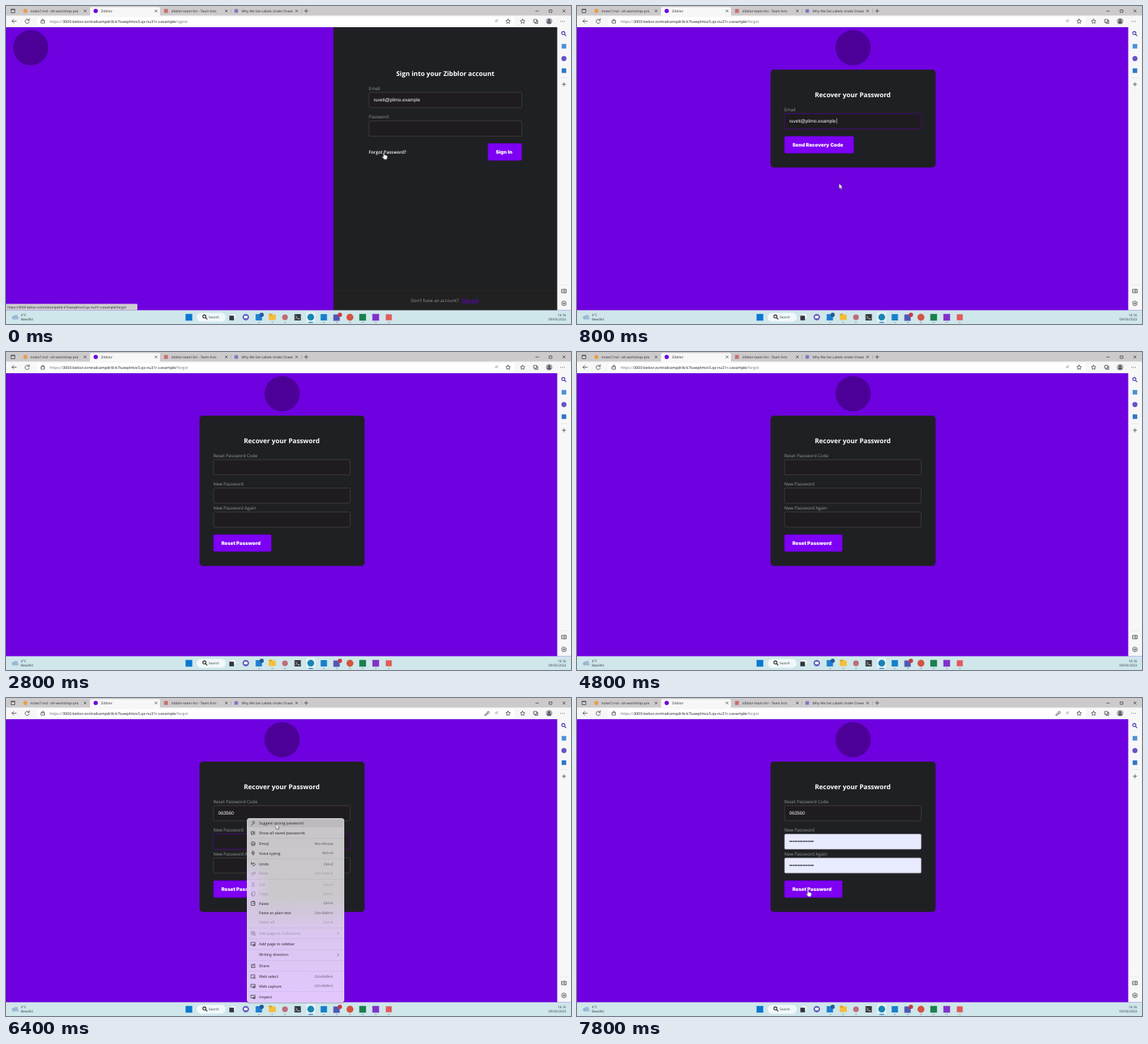
Animation of 800x450 px, one loop 8 s. Source, as an HTML page:

```html
<!DOCTYPE html>
<html lang="en">
<head>
<meta charset="utf-8">
<title>Password recovery</title>
<style>
html, body { margin: 0; width: 100%; height: 100%; overflow: hidden; background: #6f00e0; }
svg { display: block; width: 100vw; height: 100vh; }
text { font-family: "Open Sans", "Noto Sans", sans-serif; text-rendering: geometricPrecision; white-space: pre; }
.tab { font-size: 4.9px; fill: #2c2c2e; }
.url { font-size: 5.35px; fill: #66696c; }
.url tspan { fill: #151718; }
.status { font-size: 4.6px; font-weight: 500; fill: #1c1c1c; }
.tray { font-size: 4.7px; fill: #2b3a40; }
.end { text-anchor: end; }
.title { font-size: 9.3px; font-weight: 700; fill: #fff; text-anchor: middle; }
.label { font-size: 6.25px; fill: #989899; }
.link { font-size: 6.25px; font-weight: 600; fill: #fff; }
.button { font: 900 6.95px Inter, sans-serif; fill: #fff; }
.input { font: 6.67px "Liberation Sans", Arial, sans-serif; fill: #fff; }
.dark { fill: #14141c; }
.field { fill: #1f1c20; stroke: #48433f; stroke-width: .8; }
.focus { fill: #1f1c20; stroke: #48008f; stroke-width: .8; }
.filled { fill: #e8eafd; stroke: #8c8c9a; stroke-width: .5; }
.action { fill: #7d00f3; stroke: #6400c8; stroke-width: .8; }
.item { font-size: 5.4px; fill: #222025; }
.key { font-size: 4.8px; fill: #4d4952; text-anchor: end; }
.off { fill: #98909f; }
.icon { fill: none; stroke: #3c4043; stroke-width: .8; stroke-linecap: round; stroke-linejoin: round; }

.timed { animation: 8s step-end infinite; }
.signin { animation-name: signin; }
.recover { animation-name: recover; }
.focused { animation-name: focused; }
.typed { animation-name: typed; }
.reset { animation-name: reset; }
.code { animation-name: code; }
.menu { animation-name: menu; }
.saved { animation-name: saved; }
.keyhole { animation-name: keyhole; }
.cursor { animation-name: cursor; }
.hand { animation-name: hand; }
.arrow { animation-name: arrow; }
@keyframes signin { 0% { opacity: 1 } 2.5%, to { opacity: 0 } }
@keyframes recover { 0% { opacity: 0 } 2.5% { opacity: 1 } 20%, to { opacity: 0 } }
@keyframes focused { 0% { opacity: 0 } 5% { opacity: 1 } 20%, to { opacity: 0 } }
@keyframes typed { 0% { opacity: 0 } 7.5% { opacity: 1 } 20%, to { opacity: 0 } }
@keyframes reset { 0% { opacity: 0 } 20%, to { opacity: 1 } }
@keyframes code { 0% { opacity: 0 } 70%, to { opacity: 1 } }
@keyframes menu { 0% { opacity: 0 } 75% { opacity: 1 } 85%, to { opacity: 0 } }
@keyframes saved { 0% { opacity: 0 } 85%, to { opacity: 1 } }
@keyframes keyhole { 0% { opacity: 0 } 75%, to { opacity: 1 } }
@keyframes hand { 0% { opacity: 1 } 2.5% { opacity: 0 } 15% { opacity: 1 } 20% { opacity: 0 } 95%, to { opacity: 1 } }
@keyframes arrow { 0% { opacity: 0 } 2.5% { opacity: 1 } 15% { opacity: 0 } 20% { opacity: 1 } 95%, to { opacity: 0 } }
@keyframes cursor {
  0% { transform: translate(535px, 207px) }
  2.5% { transform: translate(482px, 190px) }
  5% { transform: translate(400px, 165px) }
  7.5% { transform: translate(382px, 205px) }
  10% { transform: translate(371px, 251px) }
  12.5% { transform: translate(362px, 220px) }
  15% { transform: translate(352px, 198px) }
  20% { transform: translate(360px, 206px) }
  22.5% { transform: translate(-20px, -20px) }
  67.5% { transform: translate(385px, 163px) }
  72.5%, 75% { transform: translate(341px, 203px) }
  77.5% { transform: translate(364px, 188px) }
  80%, 85% { transform: translate(382px, 178px) }
  87.5% { transform: translate(372px, 205px) }
  90% { transform: translate(354px, 238px) }
  92.5% { transform: translate(338px, 262px) }
  95%, to { transform: translate(327px, 271px) }
}
</style>
</head>
<body>
<svg id="stage" viewBox="0 0 800 450" preserveAspectRatio="none"></svg>
<script>
const text = (x, y, cls, str) => `<text x="${x}" y="${y}" class="${cls}">${str}</text>`;
const rect = (x, y, w, h, fill, r = 0) =>
  `<rect x="${x}" y="${y}" width="${w}" height="${h}" rx="${r}" fill="${fill}"/>`;
const box = (x, y, w, cls, h = 21.5) =>
  `<rect x="${x}" y="${y}" width="${w}" height="${h}" rx="1.6" class="${cls}"/>`;
const dot = (x, y, r, fill) => `<circle cx="${x}" cy="${y}" r="${r}" fill="${fill}"/>`;
const square = (x, y, s, fill) => rect(x - s / 2, y - s / 2, s, s, fill, .6);
const path = (d, extra = '') => `<path class="icon" d="${d}" ${extra}/>`;
const timed = (name, body) => `<g class="timed ${name}">${body}</g>`;
const cross = (x, y, s = 1.5) => path(`M${x - s} ${y - s}l${2 * s} ${2 * s}m0 ${-2 * s}l${-2 * s} ${2 * s}`);
const plus = (x, y) => path(`M${x - 2.5} ${y}h5m-2.5-2.5v5`);
const lens = (x, y, color) =>
  path(`M${x + 1} ${y + 1}l2.2 2.2M${x + 1.6} ${y - .7}a2.2 2.2 0 1 1-4.4 0a2.2 2.2 0 1 1 4.4 0`,
    `style="stroke:${color};stroke-width:1.1"`);
const star = (x, y) => path(`M${x} ${y - 3}l1 2 2.2.3-1.6 1.5.4 2.2-2-1-2 1 .4-2.2-1.6-1.5 2.2-.3z`);

const host = '3000-belovi-zontrailcampdrib-k7tuwq4mzx5.qx-nu31r.v.example';
const email = 'ruveti@plimo.example';
const bullets = '•'.repeat(15);
const address = page => text(62, 23.6, 'url', `https://<tspan>${host}</tspan>/${page}`);
const logo = x => dot(x, 59, 25, '#4c0098');

function browser() {
  const tabs = [[34.5, 'notes7.md - olt-workshop-pra'], [134.5, 'Zibblor'],
    [234, 'zibblor-team-list - Team lists'], [333.5, 'Why We Set Labels Under Drawi']];
  return rect(0, 0, 800, 14, '#cdcacc') + rect(0, 13.5, 800, 16.5, '#f7f7f7') +
    rect(119, 1.5, 99, 13, '#f7f7f7', 2) + rect(44, 15.8, 676, 11.7, '#fff', 2) +
    path('M7.5 4.5h5v5h-5zM7.5 5.2h5') +
    dot(27.5, 7, 2.9, '#e5a04b') + dot(127, 7, 3, '#6f00e0') +
    square(226.5, 7, 5.5, '#c9706d') + square(326, 7, 5, '#7d75c4') +
    tabs.map(([x, name], i) => text(x, 8.8, 'tab', name) + cross([112, 212.5, 312, 411.5][i], 7)).join('') +
    rect(318.5, 4, .5, 6, '#9c999b') + rect(418, 4, .5, 6, '#9c999b') + plus(425, 7) +
    path('M750 7.2h4M769.5 5.5h3.5v3.5h-3.5z') + cross(790, 7, 1.8) +
    path('M14.5 21.5h-6m2.5-2.7l-2.7 2.7 2.7 2.7M32.5 20a3 3 0 1 0 .5 2.4M33 18v2.3h-2.3') +
    path('M50 20.8h4.5v3.4H50zM51 20.8v-1a1.2 1.2 0 0 1 2.5 0v1') +
    text(692.5, 23.3, 'url', 'A⁾') + star(711, 21.5) + star(731.5, 21.5) +
    path('M747.5 19h4v4h-4zM749 23v1.5h4v-4h-1.5') +
    dot(769, 21.5, 4.6, '#aaa7b0') + dot(769, 20.2, 1.7, '#55515c') + rect(766.2, 22.3, 5.6, 2.5, '#55515c', 1.2) +
    [785.5, 788, 790.5].map(x => dot(x, 21.7, .55, '#3c4043')).join('') +
    timed('keyhole', path('M681.5 21.3a1.5 1.5 0 1 1 1 .6l-3 3h-1.3v-1.4z')) +
    timed('signin', address('signin')) + timed('reset', address('forgot')) + timed('recover', address('forgot'));
}

function sidebar() {
  return rect(780.5, 30, 19.5, 400.5, '#f7f7f7') + lens(789.7, 39, '#3f2fae') +
    square(790, 57, 6.5, '#4d91d6') + dot(790, 74.3, 3.6, '#6952c4') + square(790, 91.5, 6.5, '#2f76c5') +
    rect(785, 101, 10, .5, '#d5d7d8') + plus(790, 110.8) +
    rect(784, 394, 12, .5, '#dcdedf') + path('M787 401h6.3v4.8H787zM791 401v4.8M788.2 403.3h1.7') +
    path('M790 417.5l3 1.6v3.6l-3 1.6-3-1.6v-3.6zM791.2 420.9a1.2 1.2 0 1 1-2.4 0a1.2 1.2 0 1 1 2.4 0');
}

function taskbar() {
  const running = [358.5, 377, 395, 431.5, 450, 468.5, 487, 505, 523.5, 542];
  return rect(0, 430.5, 800, 19.5, '#cfe6eb') +
    dot(11, 441, 2.5, '#8aa9c8') + dot(14, 440, 3, '#9dbad5') + rect(9, 440.5, 9, 3, '#9dbad5', 1.5) +
    text(21, 438.8, 'tray', '4°C') + text(21, 445.4, 'tray', 'Bewölkt') +
    square(259, 440.5, 9.5, '#0a78d0') + rect(270, 434.3, 41, 12.4, '#f1f8fa', 6.2) +
    lens(281.5, 440, '#222') + text(287, 442.4, 'tray', 'Search') +
    square(322, 439, 6, '#f4f6f7') + square(319.5, 441.5, 6.5, '#30343a') +
    dot(339.5, 440.3, 4.6, '#6560c2') + rect(337, 438.4, 5, 3.4, '#fff', 1) +
    square(358, 440.5, 9, '#1f7fd1') + dot(362, 437, 3, '#245c92') +
    rect(372, 436.5, 10, 8, '#f4bf3a', 1) + rect(372, 435.4, 5, 2, '#dca021', .6) +
    dot(395, 440.5, 4, '#be6c7a') + square(413, 440.5, 9, '#363a3e') +
    path('M410.5 438.8l1.7 1.7-1.7 1.7M413 442.7h2.5', 'style="stroke:#fff"') +
    rect(425, 432.5, 13, 15, '#e3f1f5', 1.5) + dot(431.5, 440.3, 4.8, '#1685b5') +
    square(450, 440.5, 9, '#1680ca') + square(468, 441, 9, '#5157b1') + dot(472.8, 437, 3, '#c93845') +
    dot(487, 440.5, 4.9, '#d3543f') + square(505, 440.5, 9.5, '#19804b') +
    square(523.5, 440.5, 9.5, '#8131ca') + square(542, 440.5, 8.5, '#e05c5c') +
    running.map(x => rect(x - 1.5, 447.4, 3, .9, '#7a8c92', .4)).join('') +
    rect(428, 447.2, 7, 1.1, '#0a74bd', .5) +
    text(793, 438.8, 'tray end', '16:16') + text(793, 445.4, 'tray end', '09/03/2023');
}

const button = (x, y, w, name) => box(x + .4, y + .4, w - .8, 'action', 23.8) + text(x + 11.4, y + 15, 'button', name);

function signInPage() {
  return rect(463.7, 30, 317.3, 401, '#1f2023') + rect(464, 402, 317, 28.5, '#222122') +
    rect(464, 402, 317, .6, '#2c2a2b') + logo(35) +
    text(622, 99, 'title', 'Sign into your Zibblor account') +
    text(513.7, 118.7, 'label', 'Email') + box(513.9, 122.3, 216.5, 'field') + text(520.5, 135, 'input', email) +
    text(513.7, 159, 'label', 'Password') + box(513.9, 162.7, 216.5, 'field') +
    text(513.7, 209, 'link', 'Forgot Password?') + button(682, 194.2, 48.6, 'Sign In') +
    text(573.3, 418.8, 'label', 'Don\'t have an account?') +
    `<text x="645.5" y="418.8" class="link" style="fill:#6500cc;text-decoration:underline">Sign up!</text>` +
    rect(0, 421.5, 186, 9, '#cfcdd0', 1) + text(2, 428, 'status', `https://${host}/forgot`);
}

const card = height => logo(391) + rect(274, 90, 233.7, height, '#1f2023', 5) +
  text(390.5, 129, 'title', 'Recover your Password');
const formRow = (y, name) => text(293.5, y - 3.6, 'label', name) + box(293.9, y, 193.4, 'field');

function recoverPage() {
  return card(138.5) + formRow(152.3, 'Email') + button(293.5, 184, 98.7, 'Send Recovery Code') +
    timed('focused', box(293.9, 152.3, 193.4, 'focus')) +
    timed('typed', text(300.5, 165.2, 'input', email) + rect(367.6, 159, .6, 7.5, '#fff'));
}

function resetPage() {
  const saved = y => box(293.9, y, 193.4, 'filled') + text(300.5, y + 12.8, 'input dark', bullets);
  return card(212.7) + formRow(152.3, 'Reset Password Code') + formRow(192.5, 'New Password') +
    formRow(226.3, 'New Password Again') + button(293.5, 258, 82.5, 'Reset Password') +
    timed('code', text(300.5, 165.2, 'input', '063560')) +
    timed('saved', saved(192.5) + saved(226.3));
}

function contextMenu() {
  const glyphs = {
    key: 'M1 0a1.5 1.5 0 1 1 1-1M1-.2l-3.5 3', keys: 'M-2.5-2h3v3h-3zM2-2v4l-1.2 1M-2 1v2',
    face: 'M2.8 0a2.8 2.8 0 1 1-5.6 0a2.8 2.8 0 1 1 5.6 0M-1.4.8q1.4 1.4 2.8 0M-1-.8v.1M1-.8v.1',
    mic: 'M-1-2.8h2v3h-2zM-2-.2q2 3.4 4 0M0 1.6v1.4', undo: 'M-2.5-2.5v2.6h2.6M-2.3-.2q2.3-3 4.5-.5t-2.7 3.5',
    redo: 'M2.5-2.5v2.6h-2.6M2.3-.2q-2.3-3-4.5-.5t2.7 3.5', cut: 'M-1.5-3l3 5M1.5-3l-3 5M-2 2.5h1M1 2.5h1',
    copy: 'M-1-3h3.5v4.5h-3.5zM-2.4-1.5v4.4h3.6', paste: 'M-2.3-2.4h4.6v5.2h-4.6zM-1-3h2M0 0h2.3',
    plus: 'M-2.5-2.5h4v4h-4zM-1 3h3.7v-4M-.5-1.5v2M-1.5-.5h2', panel: 'M-2.8-2.4h5.6v4h-5.6zM.5.2h1.9v2.4h-1.9z',
    share: 'M0-2h-2.5v4.5h5v-2M-.8.8q.4-2.6 3.2-2.6M1.2-3l1.4 1.2-1.4 1.2', crop: 'M-2.8-2.4h5v4.6h-5zM0 0l3 2.6'
  };
  const rows = [
    [177.5, 'Suggest strong password', 'key'], [191, 'Show all saved passwords', 'keys'],
    [206.2, 'Emoji', 'face', 'Win+Period'], [219.7, 'Voice typing', 'mic', 'Win+H'],
    [235, 'Undo', 'undo', 'Ctrl+Z'], [248.5, 'Redo', 'redo', 'Ctrl+Shift+Z', 1],
    [264, 'Cut', 'cut', 'Ctrl+X', 1], [277.3, 'Copy', 'copy', 'Ctrl+C', 1],
    [290.6, 'Paste', 'paste', 'Ctrl+V'], [304, 'Paste as plain text', '', 'Ctrl+Shift+V'],
    [317.4, 'Select all', '', 'Ctrl+A', 1], [332.8, 'Add page to Collections', 'plus', '›', 1],
    [348.2, 'Add page to sidebar', 'panel'], [363.5, 'Writing direction', '', '›'],
    [379, 'Share', 'share'], [394.2, 'Web select', 'crop', 'Ctrl+Shift+X'],
    [407.6, 'Web capture', 'panel', 'Ctrl+Shift+S'], [422.9, 'Inspect', 'panel']
  ];
  const row = ([y, name, glyph, key = '', off]) => {
    const arrow = key === '›';
    return text(358.3, y + 1.9, off ? 'item off' : 'item', name) +
      (glyph ? `<g transform="translate(350 ${y})" opacity="${off ? .4 : 1}">${path(glyphs[glyph])}</g>` : '') +
      (arrow ? path(`M469.5 ${y - 1.7}l1.7 1.7-1.7 1.7`, `opacity="${off ? .4 : .8}"`)
             : text(463, y + 1.7, off ? 'key off' : 'key', key));
  };
  const lines = [198.6, 227.4, 256.2, 325.1, 340.5, 355.8, 371.2, 386.6, 415.3];
  return box(293.9, 192.5, 193.4, 'focus') +
    rect(340.3, 170.3, 139.4, 262, '#0003', 4) + rect(341, 170, 138, 261, 'url(#acrylic)', 4) +
    rect(341, 230, 70, 80, 'url(#glow)') + rect(342.5, 172, 135, 11, '#00000010', 2) +
    lines.map(y => rect(341, y, 138, .5, '#0000001c')).join('') + rows.map(row).join('');
}

const pointer = timed('cursor', '<g transform="scale(1.15)" fill="#fff" stroke="#222" stroke-width=".4">' +
  timed('arrow', '<path d="M0 0v6.6l1.5-1.3 1 2.3 1.2-.5-1-2.3h2z"/>') +
  timed('hand', '<path d="M-.6.8q.8-1.2 1.4 0v2.4l3 .7q.8.3.6 1.3l-.5 2.8q-.2.8-1 .8h-2.3l-2.8-3q-.2-1 .8-.7l.8.6z"/>') + '</g>');

document.getElementById('stage').innerHTML =
  `<defs><linearGradient id="acrylic" x2="0" y2="1">
    <stop stop-color="#c9c6ca"/><stop offset=".42" stop-color="#cac8cb"/>
    <stop offset=".62" stop-color="#dac6f0"/><stop offset="1" stop-color="#e2c7fd"/>
  </linearGradient>
  <radialGradient id="glow" cx="0" r="1" fy=".5">
    <stop stop-color="#dfc6fb"/><stop offset=".5" stop-color="#dfc6fb" stop-opacity="0"/>
  </radialGradient></defs>` +
  rect(0, 30, 781, 401, '#6f00e0') +
  timed('signin', signInPage()) + timed('recover', recoverPage()) + timed('reset', resetPage()) +
  browser() + sidebar() + taskbar() + timed('menu', contextMenu()) + pointer;
</script>
</body>
</html>
```
